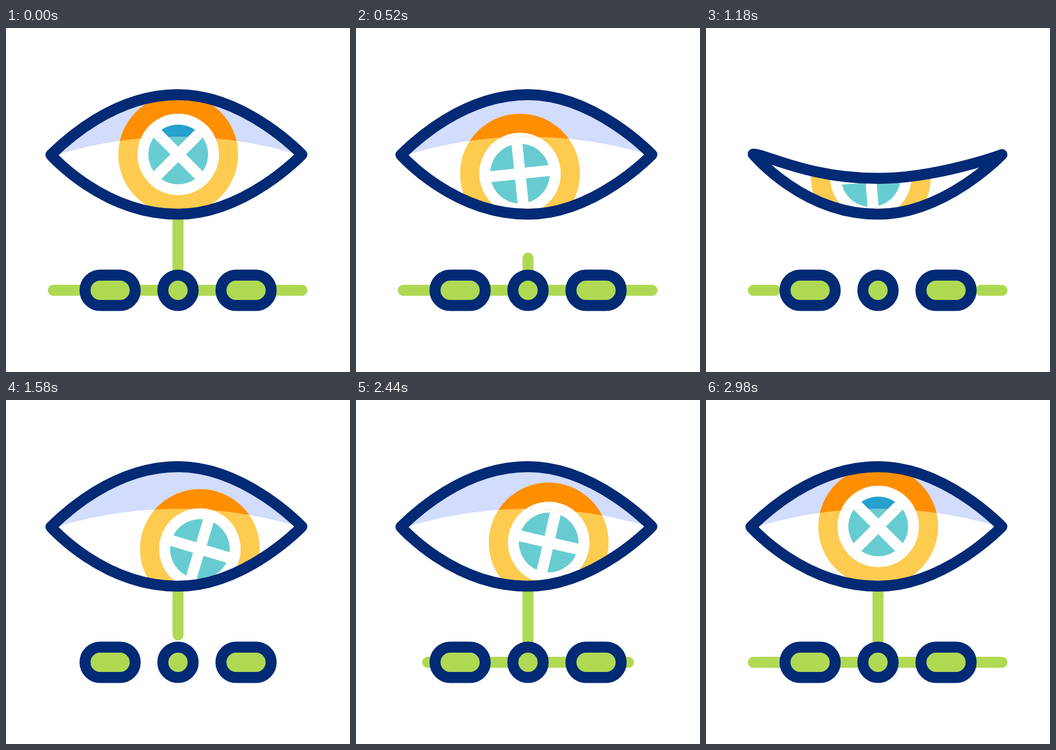
An HTML page with a canvas that plays this animation: 640x640 px, repeating every 3.02 s.

```html
<!DOCTYPE html>
<html lang="en">
<head>
<meta charset="utf-8">
<title>Eye and chain</title>
<style>
html, body { margin: 0; width: 100%; height: 100%; overflow: hidden; background: #fff; }
canvas { display: block; width: 640px; height: 640px; }
</style>
</head>
<body>
<canvas id="stage"></canvas>
<script>
const LOOP = 3020;
const NAVY = '#022a75', GREEN = '#b0d953';
const LIGHT = { sclera: '#fff', iris: '#fdcb50', pupil: '#67ccd1' };
const SHADE = { sclera: '#d2dcfd', iris: '#ff8f00', pupil: '#26a0cd' };

const canvas = document.getElementById('stage');
const ctx = canvas.getContext('2d');
const ratio = window.devicePixelRatio || 1;
canvas.width = canvas.height = 640 * ratio;

const mix = (a, b, p) => a + (b - a) * p;

// Timing curve with control points (a, 0) and (b, 1)
function ease(t, a = 1 / 3, b = 2 / 3) {
  if (t <= 0) return 0;
  if (t >= 1) return 1;
  let lo = 0, hi = 1, u = 0.5;
  for (let i = 0; i < 24; i++) {
    u = (lo + hi) / 2;
    const x = 3 * (1 - u) * (1 - u) * u * a + 3 * (1 - u) * u * u * b + u * u * u;
    if (x < t) lo = u; else hi = u;
  }
  return u * u * (3 - 2 * u);
}

const span = (t, from, to, a, b) => ease((t - from) / (to - from), a, b);

function gaze(t) {
  const poses = [
    { x: 0, y: 0, turn: 0 },
    { x: -18, y: 42, turn: 46 },
    { x: 53.5, y: 42, turn: -45 },
    { x: 0, y: 0, turn: 0 }
  ];
  const moves = [[0, 690], [1080, 1770], [2190, 2898]];
  let i = 0;
  while (i < 2 && t >= moves[i + 1][0]) i++;
  const p = span(t, ...moves[i]), a = poses[i], b = poses[i + 1];
  return {
    x: 320.4 + mix(a.x, b.x, p),
    y: 235.2 + mix(a.y, b.y, p),
    turn: (mix(a.turn, b.turn, p) - 45) * Math.PI / 180
  };
}

function disc(x, y, r, fill) {
  ctx.beginPath();
  ctx.arc(x, y, r, 0, Math.PI * 2);
  ctx.fillStyle = fill;
  ctx.fill();
}

// Stem runs down from the eye, then splits left and right along the bar
function wires(from, to) {
  const top = 342, stem = 146, total = 378, a = from * total, b = to * total;
  if (b - a < 0.5) return;
  ctx.strokeStyle = GREEN;
  ctx.lineWidth = 20.5;
  ctx.lineCap = 'round';
  ctx.beginPath();
  if (a < stem) {
    ctx.moveTo(320, top + a);
    ctx.lineTo(320, top + Math.min(b, stem));
  }
  if (b > stem) {
    const near = Math.max(a - stem, 0), far = b - stem;
    for (const side of [-1, 1]) {
      ctx.moveTo(320 + side * near, 488);
      ctx.lineTo(320 + side * Math.min(far, side < 0 ? 232 : 230.7), 488);
    }
  }
  ctx.stroke();
}

function link(x, w) {
  ctx.beginPath();
  ctx.roundRect(x - w / 2, 488 - 28.2, w, 56.4, 28.2);
  ctx.fillStyle = GREEN;
  ctx.fill();
  ctx.strokeStyle = NAVY;
  ctx.lineWidth = 20.5;
  ctx.stroke();
}

// The left part of the lid bulges while it falls
function eyePath(shut, bulge) {
  const left = 83.5 + 6 * shut, corner = 236 - 2 * shut, top = mix(124, 346, shut);
  const path = new Path2D();
  path.moveTo(left, corner);
  path.bezierCurveTo(mix(108, 111, shut), mix(212, 243.5, shut) - bulge,
    mix(200, 186, shut) + bulge / 4, top, 320, top);
  path.bezierCurveTo(mix(445, 424, shut), top, 550.5, 235.5, 550.5, 235.5);
  path.bezierCurveTo(550.5, 235.5, 445, 346.4, 320, 346.4);
  path.bezierCurveTo(180, 346.4, left, corner, left, corner);
  path.closePath();
  return path;
}

function eyeball(g, tone) {
  ctx.fillStyle = tone.sclera;
  ctx.fillRect(60, 100, 520, 270);
  disc(g.x, g.y, 111.5, tone.iris);
  disc(g.x, g.y, 75.8, '#fff');
  disc(g.x, g.y, 55.5, tone.pupil);
  ctx.save();
  ctx.translate(g.x, g.y);
  ctx.rotate(g.turn);
  ctx.fillStyle = '#fff';
  ctx.fillRect(-60, -10.2, 120, 20.4);
  ctx.fillRect(-10.2, -60, 20.4, 120);
  ctx.restore();
}

function eye(t) {
  const fall = span(t, 700, 1080), rise = span(t, 1080, 1359);
  const path = eyePath(fall - rise, 68 * fall * (1 - fall));
  const g = gaze(t);
  ctx.save();
  ctx.clip(path);
  eyeball(g, LIGHT);
  // Shadow of the lid: everything above a wide arc
  const r = 780;
  ctx.beginPath();
  ctx.rect(60, 100, 520, 270);
  ctx.arc(320, 202.5 + r, r, 0, Math.PI * 2);
  ctx.clip('evenodd');
  eyeball(g, SHADE);
  ctx.restore();
  ctx.strokeStyle = NAVY;
  ctx.lineWidth = 20.4;
  ctx.lineJoin = 'round';
  ctx.stroke(path);
}

function draw(t) {
  ctx.setTransform(ratio, 0, 0, ratio, 0, 0);
  ctx.fillStyle = '#fff';
  ctx.fillRect(0, 0, 640, 640);
  const gone = span(t, 0, 1404, 0.433, 0.757);
  const grown = span(t, 1110, 3000, 0.243, 0.49);
  wires(gone, 1);
  wires(0, grown);
  link(193.7, 93.4);
  link(320, 56.4);
  link(446.6, 93.4);
  eye(t);
}

const start = performance.now();
function tick() {
  draw((performance.now() - start) % LOOP);
  requestAnimationFrame(tick);
}
tick();
</script>
</body>
</html>
```
